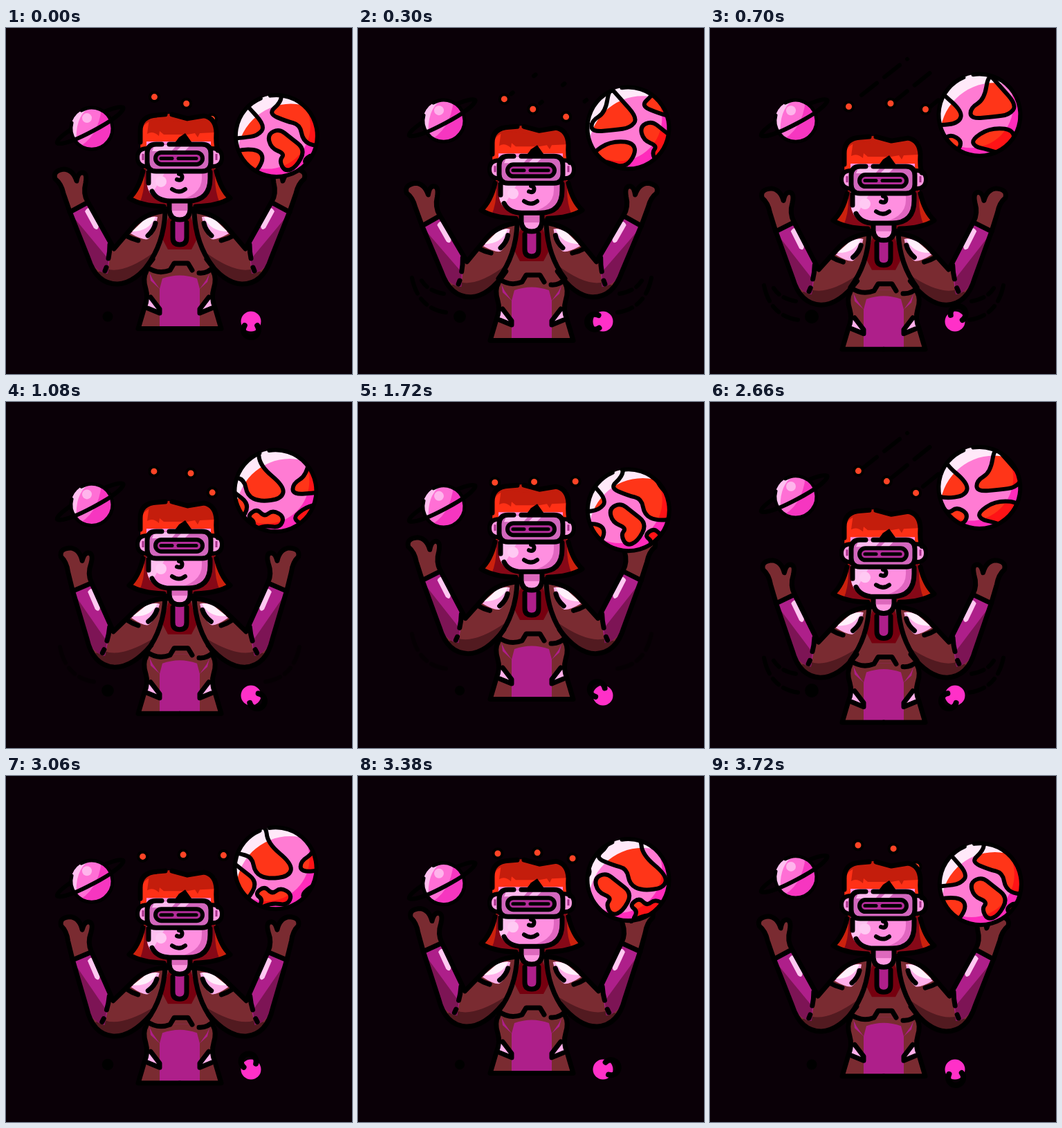
Write an HTML page that moves like this. It is 500x500 px and loops after 3740 ms.

```html
<!DOCTYPE html>
<html>
<head>
<meta charset="utf-8">
<title>Virtual reality space</title>
<style>
  html, body { margin: 0; width: 100%; height: 100%; overflow: hidden; background: #0a0007; }
  svg { display: block; width: 100vw; height: 100vh; }
  .ink { fill: none; stroke: #000; stroke-linecap: round; stroke-linejoin: round; }
  .multiply { mix-blend-mode: multiply; }
</style>
</head>
<body>
<svg viewBox="0 0 500 500" stroke-width="7">
  <defs>
    <clipPath id="globeClip"><circle r="59"/></clipPath>
    <clipPath id="moonClip"><circle r="30"/></clipPath>
    <clipPath id="faceClip"><path d="M203 160H296V216Q296 250 263 250H237Q203 250 203 216Z"/></clipPath>

    <g id="arm">
      <path fill="#7a2b31" d="M232 263Q203 266 186 283L156 318L118 250Q111 238 115 223Q118 207 109 208Q104 209 102 220Q97 204 84 203Q67 205 71 217Q80 224 83 238L92 264L119 332Q131 369 161 369Q187 368 212 333Q227 305 232 263Z"/>
      <path fill="#521a20" d="M145 347Q170 355 214 323Q192 369 161 369Q142 366 132 352Z"/>
      <path fill="#ae1f8a" d="M92 265L118 251L152 312L147 354Q130 352 119 332Z"/>
      <path fill="#7d1455" d="M94 268L148 333L147 354Q130 352 119 332Z"/>
      <path fill="#ffc8f1" d="M114 264Q119 255 124 263L134 282Q134 294 127 288Z"/>
      <path fill="#ffb0ea" d="M180 296L200 276Q211 270 219 272Q215 297 205 304Q198 306 180 296Z"/>
      <path fill="#fff0fb" d="M182 293L200 276Q209 272 216 272Q207 293 182 293Z"/>
      <path class="ink" d="M232 263Q203 266 186 283L156 318L118 250Q111 238 115 223Q118 207 109 208Q104 209 102 220Q97 204 84 203Q67 205 71 217Q80 224 83 238L92 264L119 332Q131 369 161 369Q187 368 212 333M92 265L118 251M150 312Q150 323 148 332M145 345L143 350M173 299Q182 304 191 306M216 281Q214 291 205 299"/>
    </g>

    <g id="waist">
      <path fill="#ffb0ea" d="M204 384L221 406V411L203 403Z"/>
      <path class="ink" d="M203 350Q197 361 202 376Q206 389 200 403L191 433.5H251M209 388L222 405V411L205 404"/>
    </g>

    <g id="hairSide">
      <path fill="#cc210d" d="M202 180L198 212Q192 232 178 245Q195 256 236 257V180Z"/>
      <path fill="#860817" d="M200 214Q200 236 193 252Q210 257 236 257V180H202Z"/>
      <path class="ink" d="M198 206Q192 232 178 245Q195 256 228 257"/>
    </g>

    <g id="ear">
      <path fill="#ff9ae2" d="M204 173Q190 173 190 186Q190 199 204 199Z"/>
      <path class="ink" stroke-width="6" d="M204 173Q190 173 190 186Q190 199 204 199"/>
      <path stroke="#a5308a" stroke-width="3" d="M198 181V190"/>
    </g>

    <g id="swoosh" class="ink" stroke-width="6">
      <path d="M78 341Q87 385 127 391" stroke-dasharray="24 9 12 8 40"/>
      <path class="innerArc" d="M92 345Q101 360 124 364" stroke-dasharray="12 8 40"/>
    </g>
    <g id="land"></g>
  </defs>

  <g id="trails" class="ink" stroke-width="6">
    <path d="M219 97L285 45"/><path d="M263 109L325 59"/><path d="M308 122L345 92"/>
  </g>
  <g id="meteors"></g>

  <g id="arcs">
    <use href="#swoosh"/>
    <use href="#swoosh" transform="matrix(-1 0 0 1 502 0)"/>
  </g>

  <g id="backHair">
    <use href="#hairSide"/>
    <use href="#hairSide" transform="matrix(-1 0 0 1 502 0)"/>
  </g>

  <g id="body">
    <path fill="#7a2b31" d="M231 264H271L302 345Q305 361 300 376Q296 389 302 403L311 433H191L200 403Q206 389 202 376Q197 361 200 345Z"/>
    <path fill="#ae1f8a" d="M207 350Q222 358 240 348H262Q280 358 295 350L291 366L280 376V431H222V376L209 364Z"/>
    <path fill="#7a2b31" d="M205 348Q222 356 240 348H262Q280 356 297 348L290 362L280 376L276 361Q251 352 226 361L222 376L212 362Z"/>
    <path fill="#76000f" d="M236 270H266L278 300L268 319H234L224 300Z"/>
    <use href="#waist"/>
    <use href="#waist" transform="matrix(-1 0 0 1 502 0)"/>
    <path class="ink" d="M203 344Q219 356 237 349L243 339H263L269 349M279 353Q291 354 300 344"/>
    <path fill="#ff9ae2" d="M237 240H265V266Q265 276 251 276Q237 276 237 266Z"/>
    <path fill="#dd69bd" d="M237 248H265V263H237Z"/>
    <path fill="#ae1f8a" d="M241 273H261V302Q261 313 251 313Q241 313 241 302Z"/>
    <path class="ink" d="M236 252V262Q237 276 251 276Q265 276 266 262V252M241 280V302Q241 312 251 312Q261 312 261 302V280"/>
  </g>

  <g id="arms">
    <use id="leftArm" href="#arm"/>
    <g transform="matrix(-1 0 0 1 502 0)"><use id="rightArm" href="#arm"/></g>
  </g>
  <g id="seams" class="ink">
    <path d="M230 265Q228 311 203 344M272 265Q274 311 299 344"/>
  </g>

  <g id="head">
    <path fill="#c41d0c" d="M194 176V148Q194 126 218 125L236 123L262 129L285 126Q303 128 304 150V176Z"/>
    <path fill="#ff3016" d="M195 152Q196 136 214 132Q234 138 252 137Q275 137 303 133V172H195Z"/>
    <path fill="#c41d0c" d="M207 130Q250 138 299 132L301 150L280 151L277 157L273 151L262 153L228 153L222 148L221 155Q212 147 204 152Z"/>
    <g clip-path="url(#faceClip)">
      <path fill="#ff8fe0" d="M203 163H296V250H203Z"/>
      <path fill="#e066c0" d="M283 200H296V250H240Q283 243 283 216Z"/>
      <path fill="#ffc0f0" d="M203 204H232L210 240L203 232Z"/>
      <circle cx="224" cy="221" r="8" fill="#ffc9f3"/>
    </g>
    <path d="M244 165L250 157L259 151L269 165Z"/>
    <use href="#ear"/>
    <use href="#ear" transform="matrix(-1 0 0 1 502 0)"/>
    <rect x="204" y="167" width="92" height="39" rx="13" fill="#d267bd"/>
    <path fill="#ffb9ee" d="M215 168H247L239 177H211ZM255 168H267L258 177H246Z"/>
    <rect x="216" y="179" width="68" height="17" rx="8" fill="#b22c98"/>
    <g class="ink">
      <path d="M194 164V148Q194 126 218 125L230 124M240 124L262 130L286 126Q303 129 304 150Q303 167 306 176"/>
      <path d="M206 207V223M211 235Q218 249 237 249H263Q295 249 295 216V207"/>
      <path d="M225 167H217Q204 167 204 180V193Q204 206 217 206H283Q296 206 296 193V180Q296 167 283 167H236"/>
      <rect x="216" y="179" width="68" height="17" rx="8.5" stroke-width="6"/>
      <path stroke-width="5" d="M224 187.5H240M249 187.5H275"/>
      <path stroke-width="6" d="M250 210Q256 211 254 217Q252 220 247 218M240 232Q250 239 259 232"/>
    </g>
  </g>

  <g id="moon">
    <ellipse class="ink" cy="-5" rx="54" ry="9" transform="rotate(-28)" stroke-width="6"/>
    <g clip-path="url(#moonClip)">
      <circle r="30" fill="#ff6fd5"/>
      <path fill="#ffc0f0" d="M-30 -30H-4Q-25 -16 -22 22H-30Z"/>
      <path fill="#f636c0" d="M14 -30H30V30H-24Q10 14 14 -30Z"/>
      <circle cx="-7" cy="-15" r="7" fill="#ffb4ec"/>
    </g>
    <path class="ink" d="M-15 -26A30 30 0 1 1 -29 -8" stroke-width="5"/>
    <path class="ink" d="M-54 -5Q-48 4 0 4T54 -5" transform="rotate(-28)" stroke-width="6"/>
  </g>

  <g id="globe">
    <g clip-path="url(#globeClip)">
      <circle r="59" fill="#ff7bd3"/>
      <g class="strip"><use href="#land" fill="#ff3518"/></g>
      <path class="multiply" fill="#ff59e2" fill-rule="evenodd" d="M-60 -60H60V60H-60ZM-76 -14A62 62 0 1 0 48 -14A62 62 0 1 0 -76 -14Z"/>
      <path fill="#ffe9f9" fill-rule="evenodd" d="M-60 -60H60V60H-60ZM-58 32A78 78 0 1 0 98 32A78 78 0 1 0 -58 32Z"/>
      <g class="strip"><use href="#land" class="ink" stroke-width="6"/></g>
    </g>
    <path class="ink" d="M-10 -58A59 59 0 1 1 -24 -54" stroke-width="6"/>
  </g>

  <circle id="dot" cx="147" cy="417"/>
  <g transform="translate(354 424)">
    <circle r="14.5" fill="#ff30c8"/>
    <path id="orb" class="ink" stroke-width="8" d="M6 9.2A11 11 0 1 0 6 -9.2"/>
  </g>
</svg>

<script>
const LOOP = 3740, BEAT = LOOP / 2, SPIN = 187;
const $ = id => document.getElementById(id);
const wave = (t, peak, period = BEAT) => Math.cos((t - peak) / period * 2 * Math.PI);
const place = (id, x, y) => $(id).setAttribute('transform', `translate(${x} ${y})`);

// Closed curve through the midpoints of a polygon's sides.
function blob(dx, ...p) {
  const mid = i => {
    const [a, b] = p[i % p.length], [c, d] = p[(i + 1) % p.length];
    return `${(a + c) / 2 + dx} ${(b + d) / 2}`;
  };
  return 'M' + mid(0) + p.map((_, i) => {
    const [x, y] = p[(i + 1) % p.length];
    return `Q${x + dx} ${y} ${mid(i + 1)}`;
  }).join('') + 'Z';
}

const coast = [
  blob(-108, [-26, -64], [-24, -36], [12, -6], [8, 12], [-24, 16], [-42, 7], [-46, -16], [-66, -21], [-92, -32], [-74, -48], [-72, -64]),
  blob(-30, [-28, -60], [-14, -44], [13, -14], [2, 0], [-20, 3], [-54, 6], [-54, -10], [-34, -22]),
  blob(-172, [-29, -2], [-12, -10], [3, 2], [26, 20], [12, 46], [-4, 52], [-12, 36], [-4, 26], [-24, 18]),
  blob(-119, [-31, 37], [-17, 26], [-6, 38], [6, 28], [23, 38], [16, 54], [-6, 50], [-28, 60], [-19, 46]),
  blob(-30, [-52, 36], [-28, 20], [4, 20], [11, 35], [-5, 58], [-30, 50], [-48, 46])
].join('');
$('land').innerHTML = [-SPIN, 0, SPIN].map(x => `<path d="${coast}" transform="translate(${x})"/>`).join('');
$('meteors').innerHTML = '<circle r="6.5" fill="#ff4426" stroke="#000" stroke-width="4"/>'.repeat(3);

function draw(t) {
  const p = t % BEAT;
  const bodyY = 12.8 + 18 * wave(t, 680);
  const headY = 14.3 + 18.8 * wave(t, 705);
  const swing = 3.2 * (wave(t, 1290) + 0.37);
  const bend = wave(t, 800) + 0.9;

  for (const id of ['body', 'arms', 'seams']) place(id, 0, bodyY);
  for (const id of ['head', 'backHair']) place(id, 0, headY);
  for (const id of ['leftArm', 'rightArm'])
    $(id).setAttribute('transform', `rotate(${swing} 205 290) rotate(${bend} 150 350)`);

  place('moon', 124, 143.8 - 12.3 * wave(t, 500));
  place('globe', 391 - 0.8 * wave(t, 900), 139.8 - 16.5 * wave(t, 850));
  document.querySelectorAll('.strip').forEach(s => s.setAttribute('transform', `translate(${p / BEAT * SPIN})`));

  const sway = 8.5 * wave(t, -4, LOOP / 14), drift = 8.5 * wave(t, 175, LOOP / 16);
  [[206 + sway, 108 - sway], [261 + drift, 109 - drift], [306 - sway, 123 + sway]].forEach(([x, y], i) =>
    $('meteors').children[i].setAttribute('transform', `translate(${x} ${y})`));

  // Trails run in from their far ends and fade before the figure rises again.
  const reach = Math.max(0, Math.min(1, (p - 250) / 450));
  for (const trail of $('trails').children) {
    const length = trail.getTotalLength();
    trail.setAttribute('stroke-dasharray', `${28 * reach} ${14 + 28 * (1 - reach)}`);
    trail.setAttribute('stroke-dashoffset', -length * (1 - reach) * 0.6);
  }
  $('trails').setAttribute('visibility', p > 250 && p < 950 ? 'visible' : 'hidden');

  const full = p > 150 && p < 950;
  $('arcs').setAttribute('opacity', full ? 1 : p > 950 && p < 1150 || p > 1600 && p < 1780 ? 0.5 : 0);
  document.querySelector('.innerArc').setAttribute('opacity', full ? 1 : 0);
  place('arcs', 0, bodyY - swing);

  $('dot').setAttribute('r', 8.5 + 1.5 * wave(t, 680));
  $('orb').setAttribute('transform', `rotate(${90 + 3 * 360 * t / LOOP})`);
}

(function tick() {
  draw(performance.now() % LOOP);
  requestAnimationFrame(tick);
})();
</script>
</body>
</html>
```
